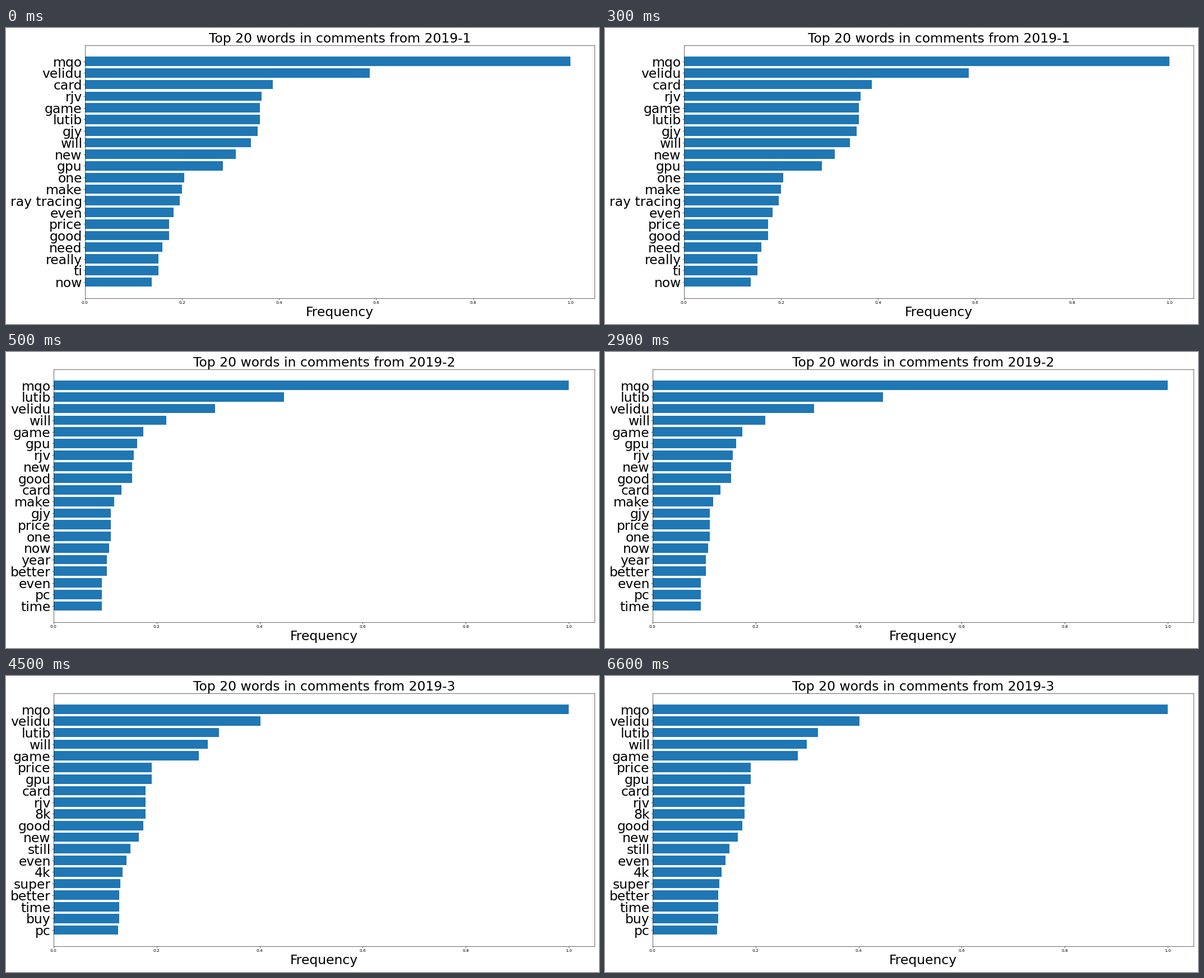
Recreate the animation shown at these times as a matplotlib script. Size 1058 by 529 pixels, loop 8000 ms.

```python
import matplotlib.pyplot as plt
from matplotlib.animation import FuncAnimation

WIDTH, HEIGHT, DPI = 1058, 529, 52.9
RIGHT, TOP, BOTTOM = 1050.1, 30.8, 482.9
FONT = 32
STEP_MS = 500

# month, left edge of the axes, steps on screen, counts by word
CHARTS = [
    (1, 140.9, 1, {
        "mqo": 225, "velidu": 132, "card": 87, "rjv": 82, "game": 81,
        "lutib": 81, "gjy": 80, "will": 77, "new": 70, "gpu": 64,
        "one": 46, "make": 45, "ray tracing": 44, "even": 41, "price": 39,
        "good": 39, "need": 36, "really": 34, "ti": 34, "now": 31}),
    (2, 84.9, 8, {
        "mqo": 425, "lutib": 190, "velidu": 133, "will": 93, "game": 74,
        "gpu": 69, "rjv": 66, "new": 65, "good": 65, "card": 56,
        "make": 50, "gjy": 47, "price": 47, "one": 47, "now": 46,
        "year": 44, "better": 44, "even": 40, "pc": 40, "time": 40}),
    (3, 84.9, 7, {
        "mqo": 1000, "velidu": 401, "lutib": 321, "will": 299, "game": 282,
        "price": 191, "gpu": 191, "card": 178, "rjv": 178, "8k": 178,
        "good": 174, "new": 166, "still": 149, "even": 142, "4k": 134,
        "super": 130, "better": 127, "time": 127, "buy": 127, "pc": 125}),
]
TIMELINE = [chart for chart in CHARTS for _ in range(chart[2])]

fig = plt.figure(figsize=(WIDTH / DPI, HEIGHT / DPI), dpi=DPI)
ax = fig.add_axes([0, 0, 1, 1])


def draw(frame):
    month, left, _, counts = TIMELINE[frame]
    peak = max(counts.values())
    ax.clear()
    ax.set_position([left / WIDTH, 1 - BOTTOM / HEIGHT,
                     (RIGHT - left) / WIDTH, (BOTTOM - TOP) / HEIGHT])
    ax.barh(list(counts), [n / peak for n in counts.values()])
    ax.invert_yaxis()
    ax.tick_params(axis="y", labelsize=FONT)
    ax.set_title(f"Top 20 words in comments from 2019-{month}", fontsize=FONT)
    ax.set_xlabel("Frequency", fontsize=FONT)
    return ax.patches


anim = FuncAnimation(fig, draw, frames=len(TIMELINE), interval=STEP_MS,
                     init_func=lambda: draw(0), repeat=True, repeat_delay=0)
plt.show()
```
